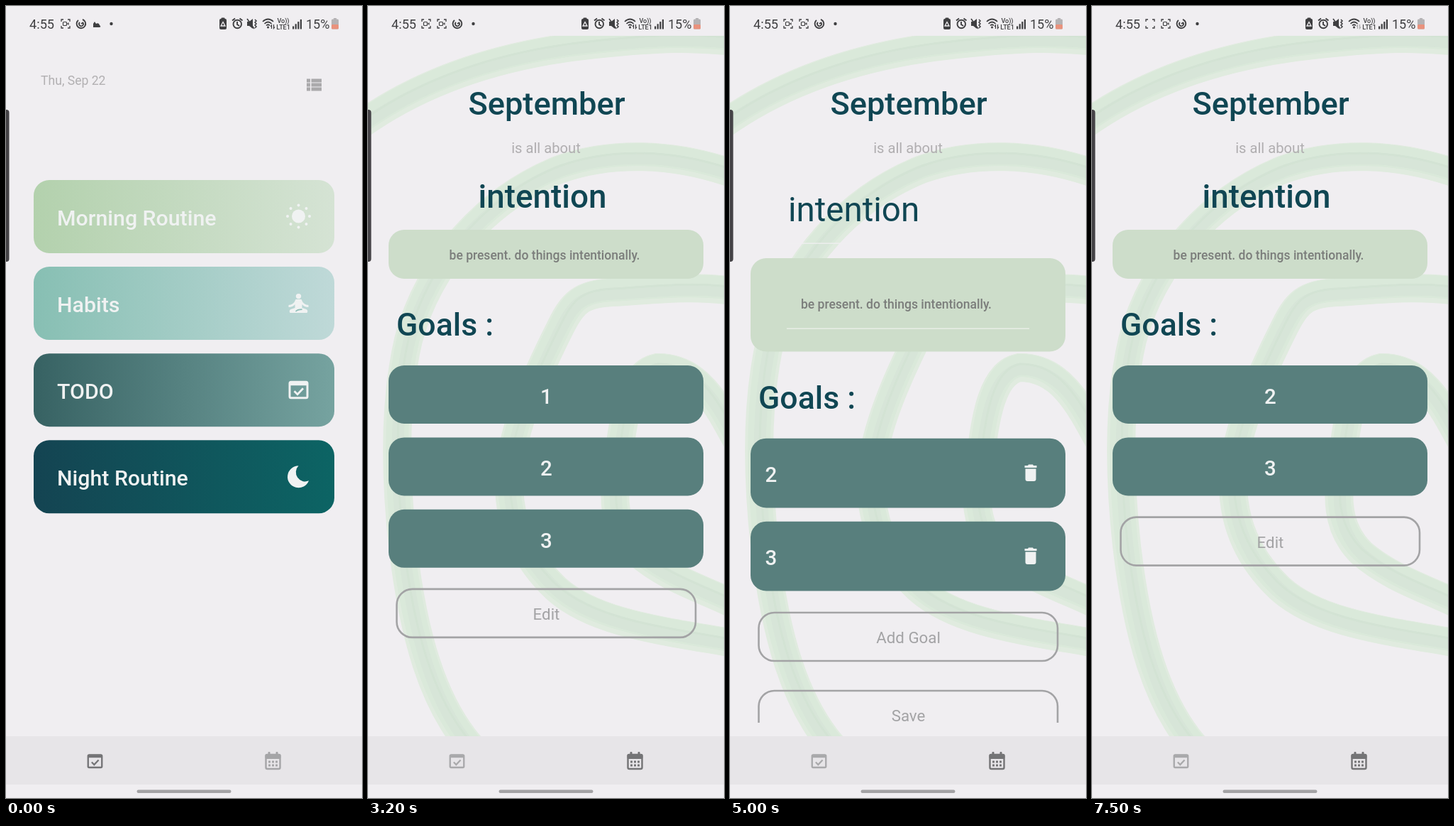
Animation, 502 px wide and 1115 px high, one loop 8000 ms. Source, as an HTML page:

```html
<!DOCTYPE html>
<html lang="en">
<head>
<meta charset="utf-8">
<title>Monthly goals</title>
<style>
html, body { margin: 0; height: 100%; overflow: hidden; background: #f0eef1; }
svg { display: block; width: 100%; height: 100%; font-family: Roboto, sans-serif; }
</style>
</head>
<body>
<svg id="stage" viewBox="0 0 502 1115" xmlns="http://www.w3.org/2000/svg"></svg>
<script>
const LOOP = 8000, FADE = 700;
const BG = '#f0eef1', DARK = '#104653', TEAL = '#587f7d', SAGE = '#cdddca',
      GREY = '#a3a3a5', INK = '#3f3f41', PALE = '#f0f2f2';

const rect = (x, y, w, h, r, fill, more = '') =>
  `<rect x="${x}" y="${y}" width="${w}" height="${h}" rx="${r}" fill="${fill}" ${more}/>`;
const dot = (x, y, r, fill) => `<circle cx="${x}" cy="${y}" r="${r}" fill="${fill}"/>`;
const line = (d, color, w, more = '') =>
  `<path d="${d}" fill="none" stroke="${color}" stroke-width="${w}" ${more}/>`;
const shape = (d, fill) => `<path d="${d}" fill="${fill}"/>`;
const text = (s, x, y, size, fill, weight = 500, anchor = 'start') =>
  `<text x="${x}" y="${y}" font-size="${size}" fill="${fill}" font-weight="${weight}" text-anchor="${anchor}">${s}</text>`;
const mid = (s, x, y, size, fill, weight) => text(s, x, y, size, fill, weight, 'middle');
const at = (x, y, body, id = '') => `<g ${id && `id="${id}"`} transform="translate(${x} ${y})">${body}</g>`;

// Icons, each centred on 0,0
const checkIcon = (color, k = 1) => `<g transform="scale(${k})">` +
  rect(-12.5, -11, 25, 22.5, 2, 'none', `stroke="${color}" stroke-width="3"`) +
  rect(-13, -12, 26, 6, 2, color) + line('M-6 2L-1.5 6.5L6.5 -2', color, 2.8) + '</g>';

const monthIcon = color => {
  let s = rect(-10, -9, 20, 20, 2, 'none', `stroke="${color}" stroke-width="2.4"`) +
    rect(-11, -10, 22, 7, 2, color) + rect(-7, -13, 3, 5, 1, color) + rect(4, -13, 3, 5, 1, color);
  for (let i = 0; i < 6; i++) s += rect(-6.5 + i % 3 * 5, i < 3 ? -.5 : 4.5, 3, 3, .5, color);
  return s;
};

const sunIcon = () => {
  let s = dot(0, 0, 9.5, PALE);
  for (let i = 0; i < 8; i++) {
    const a = i * Math.PI / 4;
    s += dot(15.5 * Math.cos(a), 15.5 * Math.sin(a), 2, PALE);
  }
  return s;
};

const poseIcon = () => dot(0, -9.5, 3.7, PALE) +
  shape('M-4 -5H4Q7 3 14 3V6Q8 6 5 2V7L11 9Q14 11 12 14H-12Q-14 11 -11 9L-5 7V2Q-8 6 -14 6V3Q-7 3 -4 -5Z', PALE) +
  line('M-4 12Q-2 9 5 9', '#8fbfb8', 1.6);

const moonIcon = () => shape('M0 -15A15.5 15.5 0 1 0 14.5 6A13 13 0 0 1 0 -15Z', PALE);

const trashIcon = () => shape('M-8.5 -11H-4L-3 -12.5H3L4 -11H8.5V-8H-8.5ZM-7.5 -6.5H7.5V8Q7.5 11 4.5 11H-4.5Q-7.5 11 -7.5 8Z', PALE);

const camIcon = line('M-3 -6H-6V-3M3 -6H6V-3M-3 6H-6V3M3 6H6V3', INK, 1.3);
const camBody = rect(-3.5, -2.5, 5, 5, 1, 'none', `stroke="${INK}" stroke-width="1.2"`) + shape('M2 0L4.5 -2V2Z', INK);
const spinIcon = line('M-4 -5A6.3 6.3 0 1 0 2 -6', INK, 1.9) + line('M-2 -2A3 3 0 1 0 2.5 -1.5L0 0', INK, 1.7);

// Shared parts
const swirls = [
  'M-20 174C80 100 200 66 320 54S460 46 520 50',
  'M152 1050C90 985 63 880 49 760C38 660 36 560 57 470C86 360 170 270 270 230C340 205 430 205 520 238',
  'M520 402C460 392 400 400 345 403C300 405 288 418 270 455C240 515 210 580 201 640C192 710 212 770 265 820C320 870 420 880 520 898',
  'M520 612C492 560 465 508 408 509C370 516 360 580 354 630C344 690 344 735 380 770C420 805 470 820 520 844'
];
const backdrop = '<g clip-path="url(#page)">' + swirls.map(d =>
  line(d, '#e0ebdf', 40) +
  line(d, '#dae9da', 32, 'transform="translate(0 -3)"') +
  line(d, '#d7e5d8', 17, 'transform="translate(1 2)"') +
  line(d, '#d3e3d4', 3, 'transform="translate(1 -5)"')).join('') + '</g>';

const nav = tab => rect(0, 1028, 502, 68, 0, '#e7e5e8') +
  at(125.5, 1063, checkIcon(tab ? '#a9a9ab' : '#747476', .78)) +
  at(376.5, 1063, monthIcon(tab ? '#747476' : '#a5a5a7'));

const button = (label, y) =>
  rect(40.5, y, 421.5, 68, 22, 'none', `stroke="${GREY}" stroke-width="2.6"`) +
  mid(label, 251.5, y + 43, 22.3, GREY, 400);

const heading = mid('September', 252, 153, 45.2, DARK) + mid('is all about', 251, 207, 20.2, '#b0aeb0', 400);
const note = 'be present. do things intentionally.';

// Screens
const home = () => {
  const cards = [
    ['Morning Routine', '#b3d1ad', '#d5e3d4', sunIcon()],
    ['Habits', '#87bfb3', '#bfd9d8', poseIcon()],
    ['TODO', '#376263', '#76a3a0', checkIcon(PALE)],
    ['Night Routine', '#144452', '#0c6464', moonIcon()]
  ];
  let s = text('Thu, Sep 22', 49, 111, 17.6, '#b2b0b2', 400);
  for (let i = 0; i < 3; i++)
    s += rect(424, 102.5 + i * 6, 5, 5, 0, '#aaa9ab') + rect(430.5, 102.5 + i * 6, 14.5, 5, 0, '#aaa9ab');
  cards.forEach(([label, from, to, icon], i) => {
    const y = 245 + i * 122.1;
    s += `<linearGradient id="c${i}"><stop stop-color="${from}"/><stop offset="1" stop-color="${to}"/></linearGradient>` +
      rect(39, y, 424, 103, 22, `url(#c${i})`) + text(label, 72, y + 64, 30.3, PALE) + at(412.5, y + 51, icon);
  });
  return s + nav(0);
};

const view = goals => backdrop + heading +
  mid('intention', 246, 284, 45.8, DARK) +
  rect(29, 315, 444, 69, 22, SAGE) + mid(note, 249, 357, 17.5, '#7b7d7b') +
  text('Goals :', 40, 464, 44.5, DARK) +
  goals.map((g, i) => rect(29, 506 + i * 101.4, 444, 82, 22, TEAL) +
    mid(g, 251.5, 560 + i * 101.4, 29.5, PALE)).join('') +
  button('Edit', 517 + goals.length * 101.3) + nav(1);

const edit = goals => {
  const end = 620 + goals.length * 117;
  return backdrop + heading +
    text('intention', 82, 303, 47.5, DARK, 400) + rect(80, 333.5, 342, 1.3, 0, '#f1f0f2') +
    rect(29, 355, 444, 131.5, 22, SAGE) + text(note, 100, 426, 17.5, '#7b7d7b') +
    rect(80, 453.5, 342, 1.3, 0, '#edf1ec') +
    text('Goals :', 40, 567, 44.5, DARK) +
    '<g clip-path="url(#list)">' +
    goals.map((g, i) => rect(29, 608.7 + i * 117, 444, 97.7, 22, TEAL) +
      text(g, 49.5, 670 + i * 117, 29.5, PALE) + at(424, 658 + i * 117, trashIcon())).join('') +
    button('Add Goal', end) + button('Save', end + 110) + '</g>' + nav(1);
};

// System bars
const status = () => {
  let s = text('4:55', 33, 32, 18.2, INK, 400) +
    at(84, 25, camIcon + `<g id="cam">${camBody}</g>`, 'rec') +
    at(104, 25, camIcon + camBody, 'cam2') + at(126, 25, spinIcon, 'spin') +
    at(128, 26, shape('M-5 4V-1L-3 -4L-1 -1Q3 -3 4 1Q7 4 3 4Z', INK), 'cloud') + dot(148.5, 25, 2.2, INK) +
    rect(301, 18, 10, 15, 2, INK) + rect(303.5, 16.5, 5, 3, 1, INK) +
    line('M306 22.5L309 28H303Z', BG, 1.3) +
    line('M320.5 25.5A5.7 5.7 0 1 0 332 25.5A5.7 5.7 0 1 0 320.5 25.5M319 20.5L323 17.5M333.5 20.5L329.5 17.5M326 22V26L329 28', INK, 1.9) +
    shape('M340 22H343L348 18V32L343 28H340Z', INK) + line('M340 18L350 32', INK, 1.6) +
    line('M351 19L353 21L351 23L353 25L351 27L353 29L351 31', INK, 1.5) +
    line('M362 22Q369.5 15 377 22M364.5 25Q369.5 20 374.5 25M367 27.5Q369.5 25 372 27.5', INK, 1.7) + dot(369.5, 30, 1.5, INK) +
    `<g id="arrows">${line('M374.5 32V27L373 29M377.5 26V31.5L379 29.5', INK, 1.2)}</g>` +
    mid('Vo))', 391, 23.5, 9, INK) + mid('LTE1', 391, 33, 9, INK);
  for (let i = 0; i < 4; i++) s += rect(404 + i * 3.6, 28.5 - i * 3.2, 2.2, 4 + i * 3.2, 0, INK);
  return s + text('15%', 423, 32, 18, INK, 400) +
    rect(459, 18.5, 10, 14, 1.5, '#b5b3b5') + rect(462, 17, 4, 2, 0, '#b5b3b5') + rect(459, 26, 10, 6.5, 1.5, '#e9927d');
};

const screens = [home(), view([1, 2, 3]), edit([1, 2, 3]), edit([2, 3]), view([2, 3])];
const $ = id => document.getElementById(id);

$('stage').innerHTML =
  `<defs><clipPath id="page">${rect(0, 42, 502, 986, 0, BG)}</clipPath>` +
  `<clipPath id="list">${rect(0, 0, 502, 1009, 0, BG)}</clipPath></defs>` +
  rect(0, 0, 502, 1115, 0, BG) +
  screens.map((s, i) => `<g id="s${i}">${rect(0, 42, 502, 1054, 0, BG)}${s}</g>`).join('') +
  status() + rect(-6, 146, 10.5, 214, 4, '#444246') + rect(184.5, 1103.5, 133, 4.5, 2.2, '#a3a2a4');

// Cubic ease (.4, 0, .2, 1)
function ease(x) {
  if (x <= 0) return 0;
  if (x >= 1) return 1;
  let lo = 0, hi = 1, u;
  for (let i = 0; i < 20; i++) {
    u = (lo + hi) / 2;
    if (1.2 * u * (1 - u) ** 2 + .6 * u * u * (1 - u) + u ** 3 < x) lo = u; else hi = u;
  }
  return 3 * u * u * (1 - u) + u ** 3;
}

// Each screen: when it enters and how long it fades in
const enter = [[-FADE, 0], [350, FADE], [3350, FADE], [4700, 0], [5945, FADE]];

function show(id, on) { $(id).style.display = on ? '' : 'none'; }

function draw(now) {
  const t = now % LOOP;
  const level = enter.map(([start, len]) => len ? ease((t - start) / len) : +(t >= start));
  screens.forEach((_, i) => {
    const o = level[i] * (1 - (level[i + 1] || 0));
    $('s' + i).setAttribute('opacity', o);
    show('s' + i, o > 0);
  });

  const moved = t >= 300;
  $('rec').setAttribute('transform', `translate(${moved ? 82 : 84} 25)`);
  $('spin').setAttribute('transform', `translate(${moved ? 126 : 106} 25)`);
  show('cam2', moved);
  show('cloud', !moved);
  show('cam', t % 1000 < 500);
  $('arrows').setAttribute('opacity', t < 5300 ? 1 : .4);
}

const begin = performance.now();
function tick() {
  draw(performance.now() - begin);
  requestAnimationFrame(tick);
}
tick();
</script>
</body>
</html>
```
